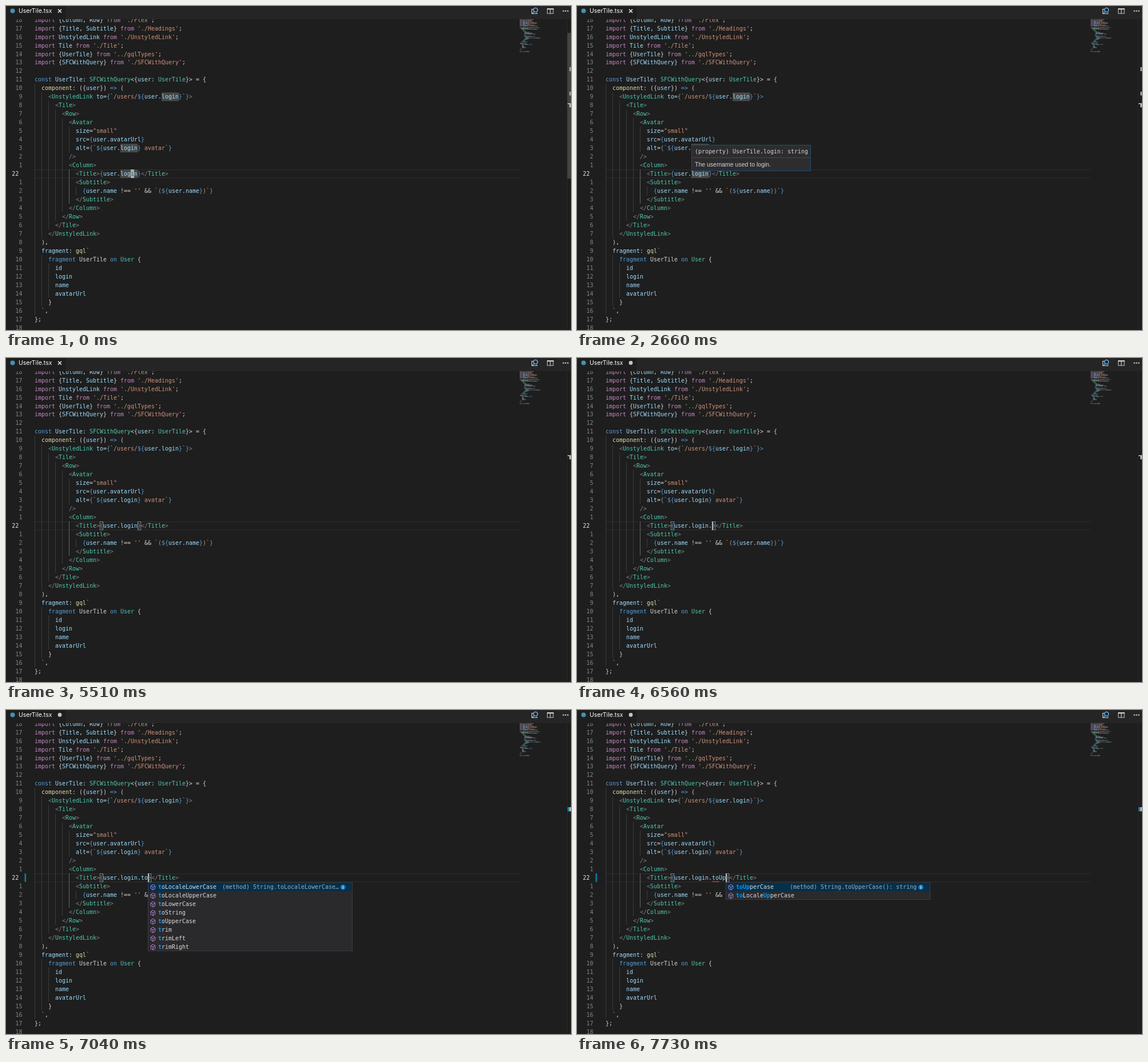
Animation of 988 by 567 pixels, one loop 8000 ms. Source, as an HTML page with a canvas:

```html
<!DOCTYPE html>
<html lang="en">
<head>
<meta charset="utf-8">
<title>Code editor</title>
<style>
  html, body { margin: 0; width: 100%; height: 100%; overflow: hidden; background: #1e1e1e; }
  canvas { display: block; width: 988px; height: 567px; }
</style>
</head>
<body>
<canvas id="stage" width="988" height="567"></canvas>
<script>
const ctx = document.getElementById('stage').getContext('2d');
const MONO = '9.97px "DejaVu Sans Mono", monospace';
const LOOP = 8000, LEFT = 50, CHAR = 6, PITCH = 14.97, ACTIVE = 22, ACTIVE_Y = 293.5;
const BG = '#1e1e1e', TEXT = '#d4d4d4';

const COLORS = {
  k: '#c586c0', d: TEXT, v: '#9cdcfe', s: '#ce9178',
  t: '#4ec9b0', b: '#569cd6', g: '#808080', f: '#dcdcaa'
};

// "~x" switches to colour x
const imp = (what, path) => `~kimport ${what} ~kfrom ~s'${path}'~d;`;
const named = (...names) => `~d{${names.map(n => '~v' + n).join('~d, ')}~d}`;
const open = name => `~g<~t${name}~g>`;
const close = name => `~g</~t${name}~g>`;
const user = prop => `~vuser~d.~v${prop}`;
const inTemplate = prop => '~b${' + user(prop) + '~b}';
const at = (depth, code) => ' '.repeat(depth * 2) + code;

const titleLine = typed =>
  at(6, `${open('Title')}~b{${user('login')}${typed && '~d.~v' + typed.slice(1)}~b}${close('Title')}`);

const LINES = [
  imp('~d* ~kas ~vUi', './interface'),
  imp('~vgql', './query-tag'),
  imp('~vAvatar', './Avatar'),
  imp(named('Column', 'Row'), './Flex'),
  imp(named('Title', 'Subtitle'), './Headings'),
  imp('~vUnstyledLink', './UnstyledLink'),
  imp('~vTile', './Tile'),
  imp(named('UserTile'), '../gqlTypes'),
  imp(named('SFCWithQuery'), './SFCWithQuery'),
  '',
  '~bconst ~vUserTile~d: ~tSFCWithQuery~d<{~vuser~d: ~tUserTile~d}> = {',
  at(1, '~fcomponent~v:~d ({~vuser~d}) ~b=>~d ('),
  at(2, '~g<~tUnstyledLink ~vto~d=~b{~s`/users/' + inTemplate('login') + '~s`~b}~g>'),
  at(3, open('Tile')),
  at(4, open('Row')),
  at(5, '~g<~tAvatar'),
  at(6, '~vsize~d=~s"small"'),
  at(6, `~vsrc~d=~b{${user('avatarUrl')}~b}`),
  at(6, '~valt~d=~b{~s`' + inTemplate('login') + '~s avatar`~b}'),
  at(5, '~g/>'),
  at(5, open('Column')),
  titleLine(''),
  at(6, open('Subtitle')),
  at(7, `~b{${user('name')} ~d!== ~s'' ~d&& ~s\`(${inTemplate('name')}~s)\`~b}`),
  at(6, close('Subtitle')),
  at(5, close('Column')),
  at(4, close('Row')),
  at(3, close('Tile')),
  at(2, close('UnstyledLink')),
  at(1, '~d),'),
  at(1, '~vfragment: ~fgql~s`'),
  at(2, '~bfragment ~dUserTile ~bon ~tUser ~d{'),
  ...['id', 'login', 'name', 'avatarUrl'].map(f => at(3, '~v' + f)),
  at(2, '~d}'),
  at(1, '~s`~d,'),
  '~d};',
  '',
  '~kexport default ~vUserTile~d;'
];

const ALL = ['anchor', 'big', 'blink', 'bold', 'charAt', 'charCodeAt', 'codePointAt',
  'concat', 'endsWith', 'fixed', 'fontcolor', 'fontsize'];
const TO = ['toLocaleLowerCase', 'toLocaleUpperCase', 'toLowerCase', 'toString', 'toUpperCase'];
const T = [...TO, 'trim', 'trimLeft', 'trimRight'];
const UPPER = ['toUpperCase', 'toLocaleUpperCase'];
const LOCALE_INFO = '(method) String.toLocaleLowerCase…';
const UPPER_INFO = '(method) String.toUpperCase(): string';
const popup = (items, match, info) => ({ items, match, info });

// Each step changes only the listed parts of the state
const STEPS = [
  [0, { scrollbar: true, cursor: 'block', words: true, tip: 0, typed: '', popup: null,
        dirty: false, changed: false, squiggle: false }],
  [390, { scrollbar: false }],
  [540, { cursor: '' }],
  [1010, { cursor: 'block' }],
  [1460, { cursor: '' }],
  [2060, { cursor: 'block' }],
  [2510, { cursor: '', tip: 0.6 }],
  [2660, { tip: 1 }],
  [4310, { cursor: 'block', tip: 0 }],
  [4910, { cursor: '' }],
  [5060, { cursor: 'block', words: false }],
  [5510, { cursor: '' }],
  [5960, { cursor: 'block' }],
  [6260, { cursor: 'bar' }],
  [6560, { typed: '.', dirty: true }],
  [6710, { popup: popup(ALL, '', '') }],
  [6890, { popup: popup(ALL, '', '(method) String.anchor(name: stri…'), changed: true }],
  [7040, { typed: '.to', popup: popup(T, 't', LOCALE_INFO) }],
  [7220, { popup: popup(TO, 'to', LOCALE_INFO) }],
  [7400, { typed: '.toU' }],
  [7550, { popup: popup(UPPER, 'toU', UPPER_INFO), squiggle: true }],
  [7730, { typed: '.toUp', popup: popup(UPPER, 'toUp', UPPER_INFO) }]
];

const colX = col => LEFT + col * CHAR;
const lineY = n => ACTIVE_Y + (n - ACTIVE) * PITCH;
const indentOf = line => line.search(/\S|$/);

function rect(x, y, w, h, color) {
  ctx.fillStyle = color;
  ctx.fillRect(x, y, w, h);
}

function text(str, x, y, color, font = MONO, align = 'left') {
  ctx.font = font;
  ctx.textAlign = align;
  ctx.fillStyle = color;
  ctx.fillText(str, x, y + 3.6);
}

function dot(x, y, r, color) {
  ctx.fillStyle = color;
  ctx.beginPath();
  ctx.arc(x, y, r, 0, 7);
  ctx.fill();
}

function stroke(points, color, width = 1) {
  ctx.strokeStyle = color;
  ctx.lineWidth = width;
  ctx.beginPath();
  points.forEach(([x, y], i) => i ? ctx.lineTo(x, y) : ctx.moveTo(x, y));
  ctx.stroke();
}

function frame(x, y, w, h, color) {
  ctx.strokeStyle = color;
  ctx.lineWidth = 1;
  ctx.strokeRect(x, y, w, h);
}

function eachToken(line, fn) {
  let col = indentOf(line);
  for (const part of line.trimStart().split('~').slice(1)) {
    const str = part.slice(1);
    fn(str, col, COLORS[part[0]]);
    col += str.length;
  }
}

function drawGuides(n, line) {
  for (let col = 0; col < indentOf(line); col += 2) {
    const active = col === 10 && n >= 22 && n <= 25;
    rect(colX(col), lineY(n) - PITCH / 2, 0.9, PITCH, active ? '#707070' : '#404040');
  }
}

function drawNumber(n) {
  const current = n === ACTIVE;
  const label = current ? n : Math.abs(n - ACTIVE);
  text(label, current ? 22.3 : 28.6, lineY(n), current ? '#e0e0e0' : '#858585', MONO, 'right');
}

function drawMinimap(lines) {
  ctx.globalAlpha = 0.6;
  lines.forEach((line, i) => eachToken(line, (str, col, color) => {
    for (const run of str.matchAll(/\S+/g)) {
      rect(898.3 + (col + run.index) * 0.7, 23.3 + i * 1.4, run[0].length * 0.7, 1, color);
    }
  }));
  ctx.globalAlpha = 1;
}

function drawRuler(s) {
  rect(981, 23, 0.8, 544, '#2a2a2a');
  if (s.scrollbar) rect(981.5, 47, 6.5, 255, '#434343');
  if (s.words) {
    rect(985, 107, 3, 7, '#989898');
    rect(985, 150, 3, 6.5, '#989898');
  }
  rect(982, 170, 6, 1.8, '#b0b0b0');
  rect(985, 170, 3, 7.3, '#b0b0b0');
  if (s.changed) rect(982, 170, 3, 7.3, '#1b81a8');
}

function drawTabs(s) {
  rect(0, 0, 988, 23, '#252526');
  rect(0, 0, 104.5, 23.5, BG);
  dot(11.5, 8.5, 4, '#4690b0');
  text('UserTile.tsx', 22, 8.7, '#fff', '10.5px Inter, sans-serif');
  if (s.dirty) {
    dot(94, 8.5, 3.4, '#c5c5c5');
  } else {
    stroke([[91, 5.8], [97, 11.8]], '#f0f0f0', 1.5);
    stroke([[97, 5.8], [91, 11.8]], '#f0f0f0', 1.5);
  }

  stroke([[922, 5.5], [919.5, 5.5], [919.5, 13.5], [928.5, 13.5], [928.5, 11.5]], '#c5c5c5', 1.2);
  stroke([[923.5, 10.5], [920.5, 13]], '#75beff', 1.4);
  ctx.strokeStyle = '#75beff';
  ctx.beginPath();
  ctx.arc(926, 7, 3.6, 0, 7);
  ctx.stroke();

  frame(946.6, 4.5, 10.4, 8.6, '#c5c5c5');
  rect(946, 4, 11.6, 2.4, '#c5c5c5');
  rect(951.2, 4, 1.2, 9.4, '#c5c5c5');
  for (const x of [974.6, 978.5, 982.4]) dot(x, 8.7, 1.3, '#c5c5c5');
}

function drawTip(alpha) {
  ctx.globalAlpha = alpha;
  rect(200, 243, 209, 46, '#2d2d30');
  frame(200.5, 243.5, 208, 45, '#1f4c6d');
  rect(201, 265, 207, 1, '#44474a');
  text('(property) UserTile.login: string', 206, 254.3, TEXT);
  text('The username used to login.', 206, 277, TEXT, '10.5px "Liberation Sans", Arial, sans-serif');
  ctx.globalAlpha = 1;
}

function drawCube(x, y) {
  const corner = i => [x + 4.4 * Math.sin(i * Math.PI / 3), y - 4.8 * Math.cos(i * Math.PI / 3)];
  stroke([0, 1, 2, 3, 4, 5, 0].map(corner), '#b180d7');
  for (const i of [1, 3, 5]) stroke([[x, y], corner(i)], '#b180d7');
}

function drawPopup({ items, match, info }, x) {
  const top = 301.8, w = 358, h = items.length * PITCH;
  rect(x, top - 0.3, w, h + 0.6, '#454545');
  rect(x + 0.8, top + 0.4, w - 1.6, h - 0.8, '#2a2a2d');
  rect(x + 0.8, top + 0.4, w - 1.6, PITCH, '#062f4a');
  items.forEach((item, row) => {
    const y = top + (row + 0.5) * PITCH + 0.2;
    drawCube(x + 9, y + 0.7);
    let hit = 0;
    [...item].forEach((ch, i) => {
      const on = ch === match[hit];
      if (on) hit++;
      text(ch, x + 18 + i * CHAR, y, on ? '#0097fb' : '#dcdcdc', on ? 'bold ' + MONO : MONO);
    });
  });
  if (info) {
    const y = top + PITCH / 2 + 0.2;
    text(info, x + 334, y, '#a0adb6', MONO, 'right');
    dot(x + 341.3, y + 0.6, 4.4, '#1b80c0');
    rect(x + 340.7, y - 2, 1.2, 1.2, '#fff');
    rect(x + 340.7, y, 1.2, 3.2, '#fff');
  }
}

function drawCursor(s, col) {
  const x = colX(col), y = ACTIVE_Y - 7.5;
  if (s.cursor === 'block') {
    rect(x, y, CHAR, 15, '#aeafad');
    text(s.words ? 'i' : '}', x, ACTIVE_Y, '#515052');
  } else if (s.cursor === 'bar') {
    rect(x + 0.2, y, 1.6, 15, '#d0d0d0');
  }
}

function render(s) {
  const lines = LINES.slice();
  lines[ACTIVE - 1] = titleLine(s.typed);
  const brace = 30 + s.typed.length;

  rect(0, 0, 988, 567, BG);
  rect(LEFT, 286, 848, 1.3, '#2b2b2b');
  rect(LEFT, 300.2, 848, 1.3, '#2b2b2b');

  if (s.words) {
    for (const [n, col] of [[13, 37], [19, 25], [22, 25]]) {
      rect(colX(col), lineY(n) - 7.4, 5 * CHAR + 0.5, 15, '#484848');
    }
  }
  lines.forEach((line, i) => {
    const n = i + 1;
    if (n < 4) return;
    if (n < 41) drawNumber(n);
    if (n > 40) return;
    drawGuides(n, line);
    eachToken(line, (str, col, color) => text(str, colX(col), lineY(n), color));
  });

  if (!s.words) {
    for (const col of [19, brace]) frame(colX(col) + 0.4, 286.5, 5.4, 14.3, '#888');
  }
  if (s.changed) rect(32.5, 286, 2.6, 15, '#0c7d9d');
  if (s.squiggle) {
    const wave = Array.from({ length: 9 }, (_, i) => [236.5 + i * 1.5, i % 2 ? 299.3 : 301.3]);
    stroke(wave, '#ea4646');
  }
  drawCursor(s, s.words ? 28 : brace);

  drawMinimap(lines);
  drawRuler(s);
  drawTabs(s);
  if (s.tip) drawTip(s.tip);
  if (s.popup) drawPopup(s.popup, colX(brace));
}

let shown = -1;
const start = performance.now();

function tick() {
  const t = (performance.now() - start) % LOOP;
  const count = STEPS.filter(([time]) => time <= t).length;
  if (count !== shown) {
    shown = count;
    render(Object.assign({}, ...STEPS.slice(0, count).map(([, change]) => change)));
  }
  requestAnimationFrame(tick);
}
tick();
</script>
</body>
</html>
```
